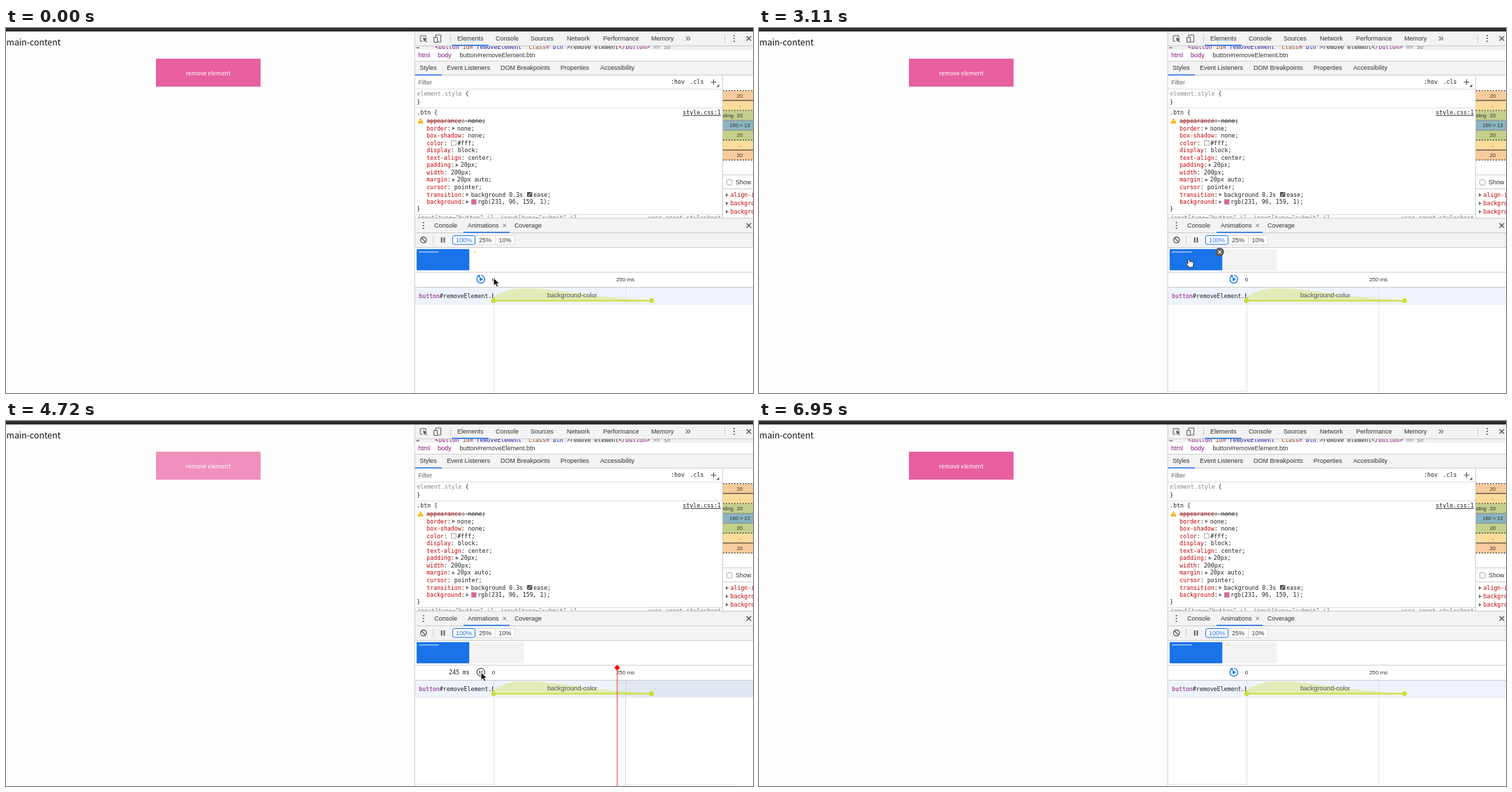
An HTML page for the animation above (7.42 s loop, 1071 by 523 pixels).

```html
<!DOCTYPE html>
<html lang="en">
<head>
<meta charset="utf-8">
<title>Animations panel</title>
<style>
html, body { margin: 0; width: 100%; height: 100%; overflow: hidden; background: #fff; }
svg { display: block; width: 100%; height: 100%; }
text { font: 9px "Liberation Sans", Arial, sans-serif; fill: #333; white-space: pre; }
.mono { font: 8.25px "DejaVu Sans Mono", monospace; fill: #222; }
.page { font-family: "Noto Sans CJK JP", "Noto Sans CJK SC", "Liberation Sans", sans-serif; font-weight: 500; }
.small { font-size: 7.5px; }
.prop { fill: #c80000; }
.tag { fill: #881280; }
.attr { fill: #994500; }
.value { fill: #1a1aa6; }
.dim { fill: #888; }
</style>
</head>
<body>
<svg id="stage" viewBox="0 0 1071 523" preserveAspectRatio="none"></svg>
<script>
const LOOP = 7420;
const stage = document.getElementById('stage');

const rect = (x, y, w, h, fill, more = '') =>
  `<rect x="${x}" y="${y}" width="${w}" height="${h}" fill="${fill}" ${more}/>`;
const path = (d, more) => `<path d="${d}" ${more}/>`;
const stroke = (d, color, w = 1, more = '') =>
  path(d, `fill="none" stroke="${color}" stroke-width="${w}" ${more}`);
const text = (x, y, str, more = '') => `<text x="${x}" y="${y}" ${more}>${str}</text>`;
const mono = (x, y, str, more = '') => text(x, y, str, `class="mono" ${more}`);
const span = (cls, str) => `<tspan class="${cls}">${str}</tspan>`;
const hline = (y, x = 586, end = 1071, color = '#ccc', more = '') => rect(x, y, end - x, 1, color, more);
const vline = (x, y, end, color = '#ccc', more = '') => rect(x, y, 1, end - y, color, more);
const arrow = (x, y) => path(`M${x} ${y - 2.5}l4 2.5l-4 2.5z`, 'fill="#6e6e6e"');
const cross = (x, y, r, color, w) =>
  stroke(`M${x - r} ${y - r}l${2 * r} ${2 * r}m0 ${-2 * r}l${-2 * r} ${2 * r}`, color, w);
const dots = (x, y) =>
  [-4, 0, 4].map(d => `<circle cx="${x}" cy="${y + d}" r="1.1" fill="#5a5a5a"/>`).join('');
const center = 'text-anchor="middle"';

// The CSS "ease" curve.
const bez = (a, b, s) => 3 * a * s * (1 - s) ** 2 + 3 * b * s * s * (1 - s) + s ** 3;
const easeX = s => bez(.25, .25, s), easeY = s => bez(.1, 1, s);
function ease(x) {
  let lo = 0, hi = 1;
  for (let i = 0; i < 20; i++) {
    const mid = (lo + hi) / 2;
    if (easeX(mid) < x) lo = mid; else hi = mid;
  }
  return easeY(lo);
}

// Area whose height follows the speed of the easing.
function speedChart(x, y, width, height) {
  let d = `M${x} ${y}`;
  const n = 40;
  for (let i = 1; i <= n; i++) {
    const s = i / n, p = (i - 1) / n, px = easeX(p), nx = easeX(s);
    const slope = Math.tanh((easeY(s) - easeY(p)) / (nx - px) / 1.5);
    d += `L${(x + (px * (1 - s) + nx * s) * width).toFixed(2)} ${(y - slope * height).toFixed(2)}`;
  }
  return d + `L${x + width} ${y}z`;
}

function page() {
  return rect(0, 0, 1071, 523, '#fdfdfd') +
    text(.5, 24.5, 'main-content', 'class="page" style="font-size:12.3px;fill:#111"') +
    rect(215, 44, 150, 40, '#e75f9f', 'id="button"') +
    text(290, 67.8, 'remove element', `class="page" ${center} style="font-size:8.4px;fill:#fff"`);
}

function topBars() {
  const tabs = [[647, 'Elements'], [702, 'Console'], [752, 'Sources'], [804, 'Network'], [856, 'Performance'], [925, 'Memory']];
  const panes = [[593, 'Styles'], [632, 'Event Listeners'], [709, 'DOM Breakpoints'], [795, 'Properties'], [852, 'Accessibility']];
  const attr = (name, value) => ' ' + span('attr', name) + span('tag', '="') + span('value', value) + span('tag', '"');
  const code = span('tag', '&lt;button') + attr('id', 'removeElement') + attr('class', 'btn') + span('tag', '&gt;') +
    'remove element' + span('tag', '&lt;/button&gt;') + span('dim', ' == $0');
  return rect(586, 5, 485, 518, '#fff') + rect(586, 5, 485, 20, '#f3f3f3') +
    stroke('M602 14V11H594V19H597', '#5a5a5a', 1) +
    path('M598 13.5l6 2.3l-2.5 1.2l2.3 2.6l-1 .9l-2.3-2.6l-1.3 2.2z', 'fill="#5a5a5a"') +
    stroke('M616 13V10H623.5V20H619M613.5 13.5H618.5V20.5H613.5z', '#5a5a5a', 1) +
    vline(637, 9, 21) + tabs.map(t => text(t[0], 18.3, t[1])).join('') +
    text(974, 19, '»', 'style="font-size:14px;fill:#555"') +
    vline(1030, 9, 21) + dots(1044, 15) + cross(1065, 15, 3.3, '#555', 1.4) +
    hline(25) + rect(639, 24, 53, 1.5, '#1a73e8') +
    rect(586, 26, 485, 5, '#f0f0f0') +
    `<g clip-path="url(#strip)">${mono(588, 28.5, '…', 'fill="#777"')}${mono(615, 29.6, code)}</g>` +
    text(591, 41.5, 'html', 'class="tag"') + text(619, 41.5, 'body', 'class="tag"') +
    text(650.5, 41.5, 'button#removeElement.btn') +
    rect(586, 47, 485, 20, '#f3f3f3') + hline(47) + hline(67) + rect(586, 66.5, 39, 1.5, '#1a73e8') +
    panes.map(t => text(t[0], 60.3, t[1])).join('');
}

function styles() {
  const rows = [
    ['appearance', 'none'], ['border', 'none', 1], ['box-shadow', 'none'], ['color', '#fff', 0, '#fff'],
    ['display', 'block'], ['text-align', 'center'], ['padding', '20px', 1], ['width', '200px'],
    ['margin', '20px auto', 1], ['cursor', 'pointer'], ['transition', 'background 0.3s', 1],
    ['background', 'rgb(231, 96, 159, 1)', 1, '#e75f9f']
  ];
  const ch = 4.967;
  let out = text(591, 80.6, 'Filter', 'style="fill:#666"') +
    mono(953, 80.3, ':hov', 'font-weight="700"') + mono(980.5, 80.3, '.cls', 'font-weight="700"') +
    stroke('M1010.5 77.5h8m-4-4v8', '#555', 1.2) + path('M1022.5 80.5v4h-4z', 'fill="#555"') +
    hline(87, 586, 1027, '#ddd') +
    mono(589, 97, span('dim', 'element.style') + ' {') + mono(589, 108.6, '}') + hline(114, 586, 1027, '#ddd') +
    mono(589, 124, '.btn {') + mono(1025, 124, 'style.css:1', 'text-anchor="end" text-decoration="underline"');
  rows.forEach(([name, value, expands, swatch], i) => {
    const y = 136 + i * 10.55, tail = 603 + (name.length + 1) * ch;
    let x = tail + (expands ? 9 : ch);
    if (expands) out += arrow(tail + 2, y - 2.7);
    if (swatch) {
      out += rect(x + .8, y - 6.2, 6.6, 6.6, swatch, 'stroke="#888" stroke-width=".7"');
      x += 9.5;
    }
    const last = name === 'transition';
    out += mono(603, y, span('prop', name) + ':') + mono(x, y, last ? value : value + ';');
    if (last) {
      out += rect(747, y - 6.5, 7.5, 7, '#555', 'rx="1"') +
        stroke(`M748.5 ${y - 1}c3 0 2-4 4.5-4`, '#fff', 1) + mono(756.3, y, 'ease;');
    }
  });
  return out + stroke('M603 133.3H687', '#333', .8) +
    path('M594.3 128.8l4.4 8h-8.8z', 'fill="#f0b400"') + stroke('M594.3 131.5v2.6m0 .8v1', '#fff', .9) +
    mono(589, 261.8, '}') + hline(267, 586, 1027, '#ddd') +
    `<g clip-path="url(#agent)">${mono(590, 275.3, 'input[type="button" i], input[type="submit" i]', 'style="fill:#777"')}` +
    mono(1025, 275.3, 'user agent stylesheet', 'text-anchor="end" font-style="italic" style="fill:#777"') + '</g>';
}

function boxModel() {
  const colors = ['#f8cb9c', '#fddc9b', '#c3cf8b', '#8bb4c0', '#c3cf8b', '#fddc9b', '#f8cb9c'];
  const labels = ['20', '-', '20', '160 × 13', '20', '-', '20'];
  let out = vline(1027, 67, 272);
  colors.forEach((c, i) => {
    const y = 90 + i * 14.2;
    out += rect(1028, y, 43, 14.2, c) + text(1052, y + 9.6, labels[i], `class="small" ${center}`);
  });
  out += `<g clip-path="url(#side)">${text(1043, 128, 'padding', 'class="small" text-anchor="end"')}</g>`;
  [0, 1, 2, 3, 4, 5, 6, 7].forEach(i => {
    const dash = [0, 2, 5, 7].includes(i) ? 'stroke-dasharray="2 2"' : '';
    const color = i === 3 || i === 4 ? '#888' : '#222';
    out += stroke(`M1028 ${89.7 + i * 14.2}H1071`, color, 1, dash);
  });
  out += hline(210, 1028) + rect(1033.5, 217.5, 7.5, 7.5, '#fff', 'rx="1.2" stroke="#aaa"') +
    text(1046, 224.3, 'Show all') + hline(230, 1028);
  ['align-items', 'background', 'background'].forEach((s, i) => {
    out += arrow(1032, 239.3 + i * 12) + mono(1038.5, 242 + i * 12, s, 'style="fill:#c80000"');
  });
  return out;
}

function drawer() {
  return rect(586, 273, 485, 41, '#f3f3f3') + hline(272) + hline(293) + hline(314) +
    dots(598.5, 283) + text(614, 286.3, 'Console') + text(662, 286.3, 'Animations') +
    cross(714.7, 283, 2.3, '#666', 1) + rect(656, 292, 66, 1.5, '#1a73e8') +
    text(729, 286.3, 'Coverage') + cross(1065, 283, 3.3, '#555', 1.4) +
    '<circle cx="598.6" cy="303.7" r="4.2" fill="none" stroke="#5a5a5a" stroke-width="1.3"/>' +
    stroke('M595.6 300.7l6 6', '#5a5a5a', 1.3) + vline(612, 298, 310) +
    stroke('M624.6 300v7.5m3.7-7.5v7.5', '#5a5a5a', 1.9) +
    rect(672.5, 297.5, 57, 12.5, '#fff', 'rx="2" stroke="#ddd"') + vline(701, 298, 310, '#ddd') +
    rect(640.5, 297.5, 32, 12.5, '#fff', 'rx="2" stroke="#1a73e8"') +
    text(656.5, 307, '100%', `${center} style="fill:#1a73e8"`) +
    text(687, 307, '25%', center) + text(715.6, 307, '10%', center) +
    rect(588.7, 316.8, 75.6, 30.5, '#1a73e8', 'id="tile1" rx="1"') + rect(592, 320.2, 28.5, 1.4, '#fff', 'id="bar1"') +
    rect(667, 316.8, 75.6, 30.5, '#fff', 'id="tile2" rx="1"') + rect(670.5, 320.2, 3.5, 1.4, '#dbe36b', 'id="bar2"') +
    '<g id="remove"><circle r="6.2" fill="#5a5a5a"/>' + cross(0, 0, 2.4, '#fff', 1.2) + '</g>' +
    hline(349.5) + hline(371) + rect(586, 372, 485, 23.5, '#eef3fc') +
    rect(0, 372, 0, 23.5, '#e2e8f1', 'id="shade"') + hline(395.5, 586, 1071, '#e3e8f0') +
    vline(699, 372, 523, '#e2e2e2') + vline(888, 372, 523, '#e2e4e8', 'id="grid"') +
    `<g clip-path="url(#label)">${mono(592, 386.6, span('tag', 'button') + '#removeElement.btn')}</g>` +
    path(speedChart(699, 390.7, 226.5, 19.5), 'fill="#cddc39" fill-opacity=".35"') +
    text(811.8, 385.6, 'background-color', `${center} style="font-size:9.3px;fill:#555"`) +
    stroke('M699 390.7H926', '#cddc39', 2) +
    '<circle cx="699" cy="390.7" r="3.4" fill="#cddc39"/><circle cx="925.5" cy="390.7" r="3.4" fill="#cddc39"/>' +
    text(699, 363, '0', `${center} style="font-size:8px"`) + text(888, 363, '250 ms', `${center} style="font-size:8px"`) +
    mono(664.8, 363, '', 'id="clock" text-anchor="end"') +
    '<g id="replay" fill="#1a73e8">' +
    stroke('M677.6 355.3A5.6 5.6 0 1 0 681.3 354.4', '#1a73e8', 1.3) +
    path('M675.6 354.2l4-.4l-.6 3.9z') + path('M679.2 357l4.8 3l-4.8 3z') + '</g>' +
    '<g id="pause"><circle cx="680.8" cy="360" r="5.6" fill="none" stroke="#444" stroke-width="1.1"/>' +
    stroke('M679.3 357.5v5m3-5v5', '#444', 1.2) + '</g>' +
    hline(520, 586, 699, '#e6e6e6', 'id="foot"') + hline(521, 586, 699, '#e6e6e6', 'id="rest"') +
    '<g id="head">' + stroke('M0 353V523', '#f43a3a', 1) + path('M0 349.3l4.1 4.1l-4.1 4.1l-4.1-4.1z', 'fill="#f00"') + '</g>';
}

const pointer =
  '<g id="arrow">' + path('M0 0V11.4L2.7 9L4.6 13L6.7 12L4.9 8.2H8.6z', 'fill="#111" stroke="#fff" stroke-width=".9"') + '</g>' +
  '<g id="hand">' + path('M-1.2-5.5q1.2-1 2 .4l1 3q1-.8 2 .2q1-.6 1.8.5q1.2-.3 1.4 1.2l-.2 3.6l-1.2 2.6h-5l-4-5q-.6-1.6 1-1.4l1.4 1z',
    'fill="#fff" stroke="#222" stroke-width="1" stroke-linejoin="round"') + '</g>';

const clip = (id, x, y, w, h) => `<clipPath id="${id}"><rect x="${x}" y="${y}" width="${w}" height="${h}"/></clipPath>`;
stage.innerHTML = '<defs>' + clip('strip', 586, 26, 485, 5) + clip('agent', 586, 268, 441, 4.3) +
  clip('side', 1028, 118, 40, 15) + clip('label', 586, 372, 113, 24) + '</defs>' +
  page() + topBars() + styles() + boxModel() + drawer() + rect(585.5, 5, 1, 518, '#ccc') +
  rect(0, 0, 1071, 5, '#2d2e32') + pointer;

const el = {};
stage.querySelectorAll('[id]').forEach(n => { el[n.id] = n; });
const set = (id, attrs) => { for (const k in attrs) el[id].setAttribute(k, attrs[k]); };
const show = (id, on) => set(id, { visibility: on ? 'visible' : 'hidden' });

// Screen recording: every value holds until the next key.
const at = (keys, t) => keys.reduce((found, k) => (k[0] <= t ? k : found));
const cursorKeys = [
  [0, 699, 358], [590, 699, 363], [740, 699, 369], [1030, 689, 365], [1180, 686, 358], [1320, 705, 335],
  [2060, 660, 336], [2210, 616, 337], [3400, 640, 345], [3550, 658, 351], [3690, 667, 355],
  [3840, 674, 359], [3990, 679, 361], [4130, 680, 361], [4280, 681, 360]
];
const clockKeys = [
  [0, -1], [2060, 62], [2210, 212], [2360, 362], [2510, -1], [3260, 88], [3400, 228], [3550, 378], [3690, -1],
  [4570, 95], [4720, 245], [4870, 395], [5020, -1], [5610, 28], [5760, 178], [5910, 328], [6060, 478], [6210, -1]
];
const within = (t, a, b) => t >= a && t < b;

function draw(t) {
  const ms = at(clockKeys, t)[1], playing = ms >= 0;
  const second = within(t, 1920, 3110);
  const elapsed = Math.max(0, ms - 10.5), x = 698.7 + elapsed * .757;

  const k = playing && !second && elapsed < 300 ? ease(elapsed / 300) : 0;
  const mix = (a, b) => Math.round(a + (b - a) * k);
  set('button', { fill: `rgb(${mix(231, 241)},${mix(95, 146)},${mix(159, 189)})` });

  const idle = t < 1920 || within(t, 5610, 5760) ? '#fff' : '#f2f2f2';
  set('tile1', { fill: second ? '#f2f2f2' : '#1a73e8' });
  set('bar1', { fill: second ? '#dbe3a0' : '#a9cbf5' });
  set('tile2', { fill: second ? '#1a73e8' : idle });
  set('bar2', { fill: second ? '#c6dcf8' : '#e6e88a' });
  show('remove', within(t, 1920, 3690));
  set('remove', { transform: `translate(${t < 2360 ? 738.5 : 660.5} 321)` });

  show('head', playing);
  show('shade', playing);
  show('rest', playing);
  set('head', { transform: `translate(${x} 0)` });
  set('shade', { x, width: Math.max(0, 1071 - x) });
  set('rest', { x, width: Math.max(0, 1047 - x) });
  set('grid', { fill: playing && x < 888 ? '#cfd1d6' : '#e4e5e8', height: t < 1920 ? 23 : 151 });
  show('foot', t >= 1920);
  el.clock.textContent = playing ? ms + ' ms' : '';
  show('pause', playing);
  show('replay', !playing);

  const [, cx, cy] = at(cursorKeys, t);
  const hand = within(t, 1920, 3550);
  show('hand', hand);
  show('arrow', !hand && t < 6510);
  set('hand', { transform: `translate(${cx} ${cy})` });
  set('arrow', { transform: `translate(${cx} ${cy})` });
}

const start = performance.now();
function tick() {
  draw((performance.now() - start) % LOOP);
  requestAnimationFrame(tick);
}
tick();
</script>
</body>
</html>
```
